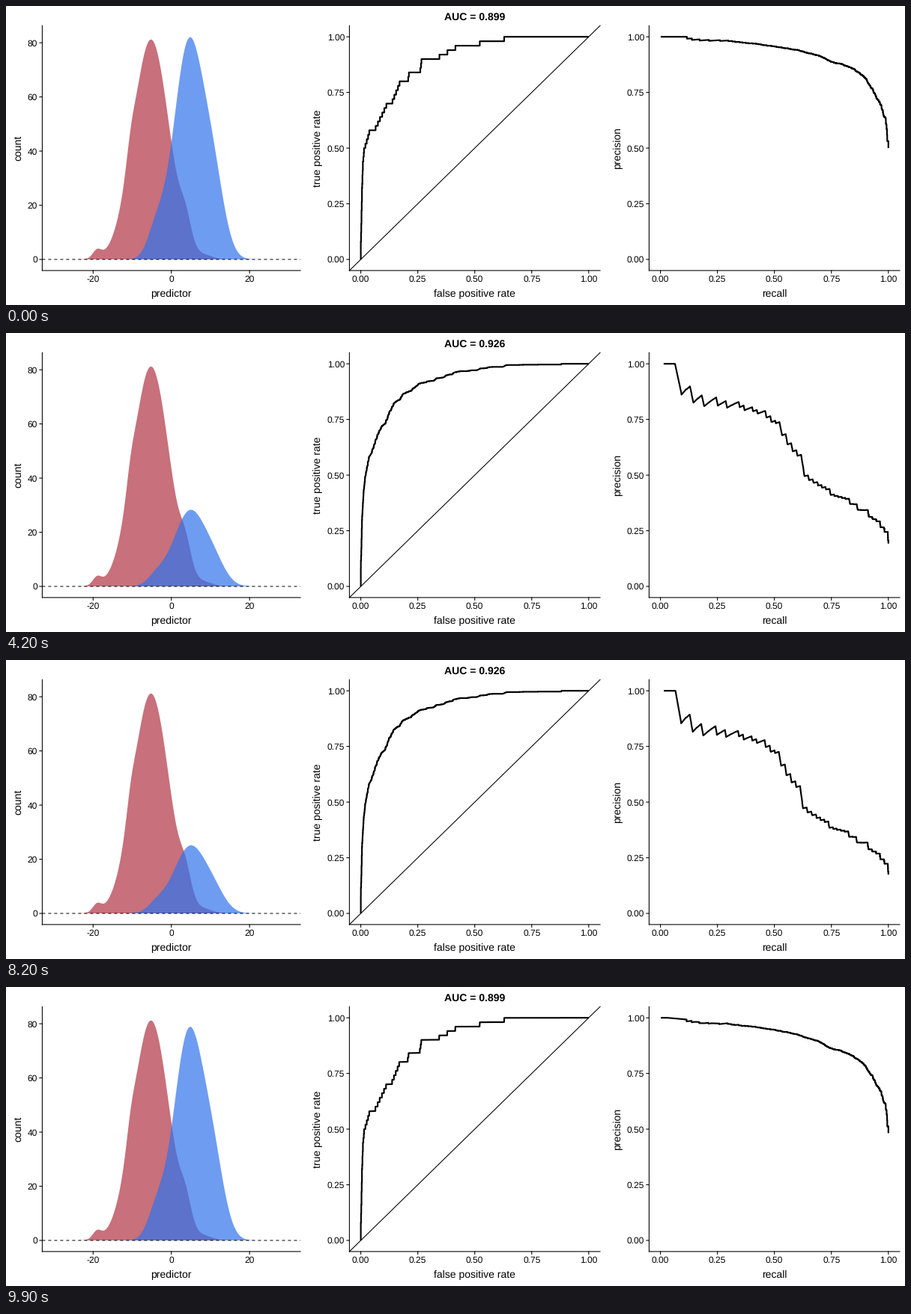
A matplotlib script that plays this animation: 1200x400 px, repeating every 10000 ms.

```python
import numpy as np
import matplotlib.pyplot as plt
from matplotlib.animation import FuncAnimation
from matplotlib.patches import Polygon

plt.rcParams["font.family"] = "Liberation Sans"
plt.rcParams["text.hinting"] = "none"
plt.rcParams["path.simplify"] = False

PX = 0.72  # points per pixel at 100 dpi
W, H = 1200, 400
TOP, BOTTOM = 26.3, 353.9
MID_Y = (TOP + BOTTOM) / 2
NEG = 1000
RED, BLUE = (177 / 255, 52 / 255, 67 / 255), (48 / 255, 115 / 255, 236 / 255)

fig = plt.figure(figsize=(W / 100, H / 100), dpi=100, facecolor="white")
ax = fig.add_axes([0, 0, 1, 1])
ax.set(xlim=(0, W), ylim=(H, 0))
ax.axis("off")


# ---------- drawing helpers ----------
def line(xs, ys, width=1.07, **kw):
    return ax.plot(xs, ys, color="black", lw=width * PX, snap=False, **kw)[0]


def text(x, y, s, size=12, ha="center", **kw):
    return ax.text(x, y, s, fontsize=size * PX, ha=ha, va="baseline",
                   color="black", **kw)


class Panel:
    """Axes frame whose limits are padded by 5 % on each side."""

    def __init__(self, column, xlim, ylim):
        self.origin = 400 * column
        self.left, self.right = self.origin + 58.4, self.origin + 393
        self.xlim, self.ylim = self.pad(xlim), self.pad(ylim)

    @staticmethod
    def pad(lim):
        extra = 0.05 * (lim[1] - lim[0])
        return lim[0] - extra, lim[1] + extra

    def x(self, v):
        return np.interp(v, self.xlim, (self.left, self.right))

    def y(self, v):
        return np.interp(v, self.ylim, (BOTTOM, TOP))

    def decorate(self, xticks, yticks, fmt, xlabel, ylabel):
        line([self.left, self.left], [TOP, BOTTOM])
        line([self.left, self.right], [BOTTOM, BOTTOM])
        for v in xticks:
            px = self.x(v)
            line([px, px], [BOTTOM, BOTTOM + 3.5])
            text(px, 369, fmt.format(v))
        for v in yticks:
            py = self.y(v)
            line([self.left - 3.5, self.left], [py, py])
            text(self.left - 6.4, py + 4.3, fmt.format(v), ha="right")
        text((self.left + self.right) / 2, 389, xlabel, 14)
        text(self.origin + 20.4, MID_Y, ylabel, 14, rotation=90,
             rotation_mode="anchor")


# ---------- data ----------
def bumps(x, *parts):
    """Sum of bell curves given as (centre, height, spread)."""
    return sum(h * np.exp(-((x - c) / s) ** 2 / 2) for c, h, s in parts)


def sweep(fp):
    """ROC and precision-recall paths, given false positives before each hit."""
    pos = len(fp)
    hit = np.zeros(pos + NEG)
    hit[np.ceil(fp - 1e-9).astype(int) + np.arange(pos)] = 1
    tp, neg = np.cumsum(hit), np.cumsum(1 - hit)
    roc = np.column_stack([np.r_[0, neg] / NEG, np.r_[0, tp] / pos])
    return roc, np.column_stack([tp / pos, tp / (tp + neg)])


def refine(path, n):
    """Split the longest segments until the path has n points."""
    size = np.hypot(*np.diff(path, axis=0).T)
    parts = np.ones(len(size), int)
    for _ in range(n - len(path)):
        parts[np.argmax(size / parts)] += 1
    t = np.concatenate([i + np.arange(c) / c for i, c in enumerate(parts)])
    t = np.r_[t, len(size)]
    return np.column_stack([np.interp(t, np.arange(len(path)), c) for c in path.T])


grid = np.linspace(-30, 30, 601)
red = bumps(grid, (-5.2, 81.2, 4.65), (-10.4, 5, 1.1), (3.7, 7.5, 1.4),
            (9, 1, 2), (-19, 2.9, 1.1))
blue_many = bumps(grid, (4.5, 80, 3.9), (-3.9, 9.5, 2.2), (10.9, 22.4, 2.85))
blue_few = bumps(grid, (7, 3.25, 2.9), (-.8, 2.3, 3.2), (13, .8, 3))

# false positives as a function of the hits so far
few_hits = [4, 6, 16, 22, 25, 29, 30, 35, 36, 40, 41, 42, 43, 45, 46, 48, 50]
few_fp = [0, 1, 5, 9, 14, 37, 65, 112, 139, 170, 208, 211, 261, 266, 345, 415, 629]
many_hits = [120, 150, 300, 420, 500, 600, 700, 760, 800, 850, 900, 935, 970, 990, 1000]
many_fp = [0, 1.5, 5, 13, 22, 37, 65, 100, 111, 145, 205, 300, 440, 600, 880]

rng = np.random.default_rng(7)
jitter = np.sort(np.arange(1, 1001) + rng.uniform(-10, 10, 1000))
roc_few, pr_few = sweep(np.interp(np.arange(1, 51), few_hits, few_fp))
roc_many, pr_many = sweep(np.interp(jitter, many_hits, many_fp))
roc_few = refine(roc_few, len(roc_many))
pr_few = refine(pr_few, len(pr_many))

# ---------- scene ----------
dens = Panel(0, (-30, 30), (0, 82.2))
dens.left -= 10  # narrower tick labels
roc = Panel(1, (0, 1), (0, 1))
prc = Panel(2, (0, 1), (0, 1))


def area(values):
    return np.column_stack([dens.x(grid), dens.y(values)])


def fill(color):
    return ax.add_patch(Polygon(area(red), closed=True, fc=color, ec="none",
                                lw=0, alpha=.7))


fill(RED)
blue = fill(BLUE)
line([dens.left, dens.right], [dens.y(0)] * 2, 1, ls=(0, (4, 4)))
line([roc.left, roc.right], [BOTTOM, TOP])

curve = dict(solid_joinstyle="round", solid_capstyle="butt")
roc_line = line([], [], 2.13, **curve)
pr_line = line([], [], 2.13, **curve)

quarters = np.arange(5) / 4
dens.decorate((-20, 0, 20), range(0, 81, 20), "{}", "predictor", "count")
roc.decorate(quarters, quarters, "{:.2f}", "false positive rate",
             "true positive rate")
prc.decorate(quarters, quarters, "{:.2f}", "recall", "precision")
title = text((roc.left + roc.right) / 2, 19, "", 14, weight="bold")


def draw(i):
    w = np.interp(i, (25, 50, 75, 100), (0, 1, 1, 0))

    def mix(a, b):
        return (1 - w) * a + w * b

    blue.set_xy(area(mix(blue_many, blue_few)))
    x, y = mix(roc_few, roc_many).T
    roc_line.set_data(roc.x(x), roc.y(y))
    x, y = mix(pr_many, pr_few).T
    pr_line.set_data(prc.x(x), prc.y(y))
    title.set_text("AUC = 0.926" if 39 <= i < 89 else "AUC = 0.899")
    return blue, roc_line, pr_line, title


anim = FuncAnimation(fig, draw, frames=100, interval=100, repeat=True,
                     repeat_delay=0)
plt.show()
```
